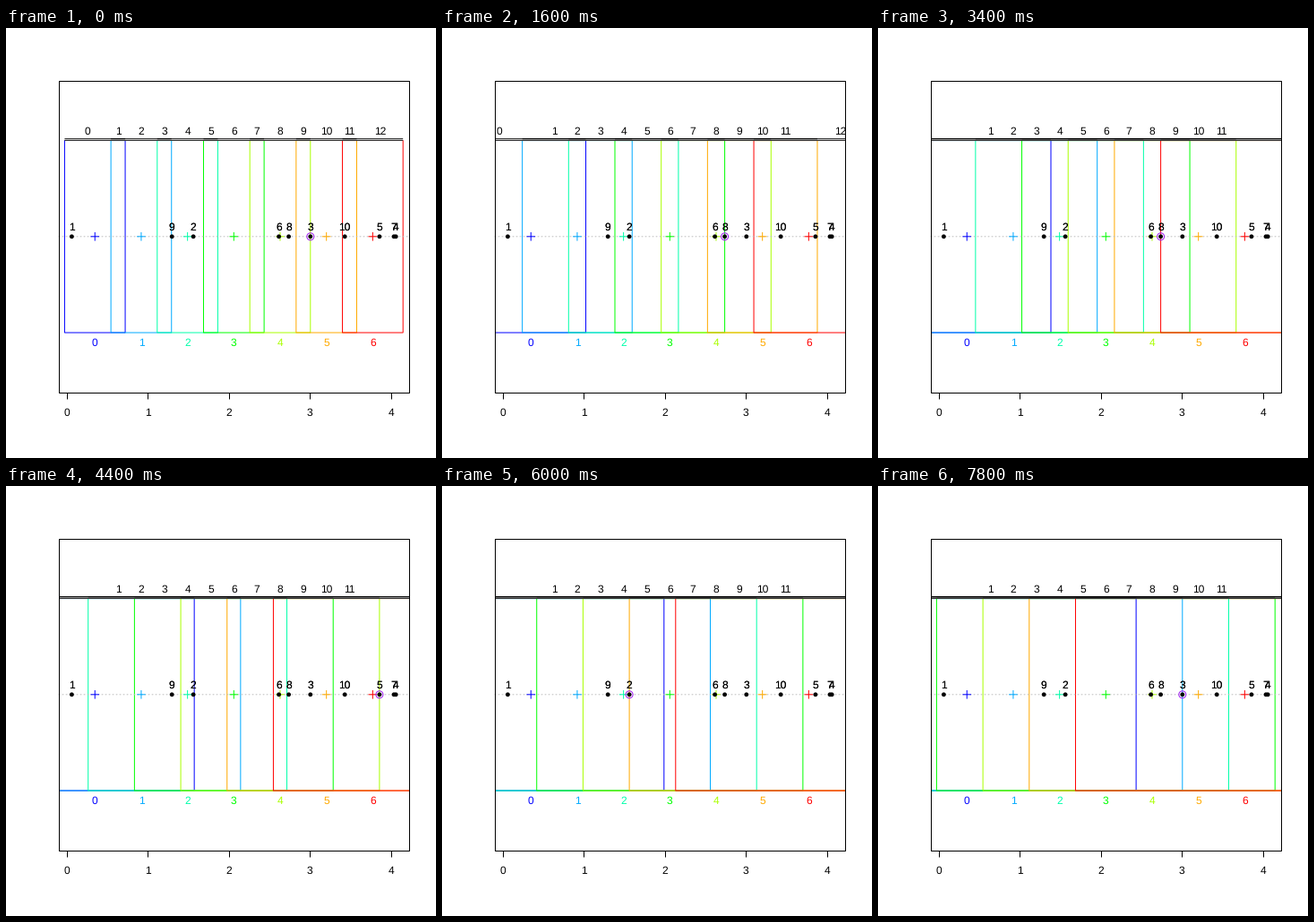
A matplotlib script that plays this animation: 480x480 px, repeating every 8000 ms.

```python
import colorsys

import matplotlib.pyplot as plt
from matplotlib.animation import FuncAnimation
from matplotlib.patches import Circle, Rectangle

plt.rcParams["font.family"] = "Liberation Sans"
plt.rcParams["font.size"] = 12
plt.rcParams["text.hinting"] = "none"

SIZE = 480
LEFT, RIGHT, TOP, BOTTOM = 59.04, 449.76, 59.04, 406.56
MID, UNIT = 232.8, 107.25           # y = 0 and the height of one y unit
X0, X_UNIT = 67.7, 90.5             # x = 0 and the width of one x unit
N = 7
FRAMES = 40

points = [73.4, 209.1, 339.8, 435.2, 416.9, 304.6, 433.0, 315.6, 185.2, 378.2]
step = (max(points) - min(points)) / N
centers = [min(points) + step * (k + 0.5) for k in range(N)]
colors = [colorsys.hsv_to_rgb((1 - k / (N - 1)) * 2 / 3, 1, 1) for k in range(N)]

# The intervals grow until the next point meets an interval edge.
events = sorted((round(abs(p - c), 1), i, abs(p - c))
                for i, p in enumerate(points) for c in centers)
events = [(half, i) for key, i, half in events if key > 33.5][:FRAMES]

fig = plt.figure(figsize=(SIZE / 72, SIZE / 72), dpi=72, facecolor="white")
ax = fig.add_axes([0, 0, 1, 1])
ax.set_xlim(0, SIZE)
ax.set_ylim(SIZE, 0)
ax.axis("off")

frame = Rectangle((LEFT, TOP), RIGHT - LEFT, BOTTOM - TOP, fill=False,
                  ec="black", lw=1, snap=True, zorder=9)
ax.add_patch(frame)
clip = Rectangle((59, 59), 391, 348, transform=ax.transData)


def y_at(v):
    return MID - v * UNIT


def line(xs, ys, color, z, snap=False, **kw):
    return ax.plot(xs, ys, color=color, lw=1, snap=snap, zorder=z, **kw)[0]


def label(x, y, text, color="black"):
    t = ax.text(x, y + 4.2, text, color=color, ha="center", va="baseline",
                zorder=8)
    return t


# axis
for v in range(5):
    x = X0 + v * X_UNIT
    line([x, x], [BOTTOM, BOTTOM + 7.2], "black", 9, snap=True,
         solid_capstyle="butt")
    label(x, 428.8, str(v))

# intervals with the black bars above them
boxes, bars = [], []
for k, color in enumerate(colors):
    box = Rectangle((0, y_at(1)), 1, 2 * UNIT, fill=False, ec=color, lw=1,
                    snap=False, zorder=2 + k / 10)
    ax.add_patch(box)
    box.set_clip_path(clip)
    boxes.append(box)
    for y, shade in ((123.75, "black"), (125.5, "#333333")):
        bar = line([0, 1], [y, y], shade, 3, solid_capstyle="butt")
        bar.set_clip_path(clip)
        bars.append((bar, k))

# center line, centers and their names
line([LEFT, RIGHT], [MID, MID], "#bebebe", 4, linestyle=(0, (1, 3)),
     dash_capstyle="round")
for k, (c, color) in enumerate(zip(centers, colors)):
    line([c - 4.3, c + 4.3], [MID, MID], color, 5)
    line([c, c], [MID - 4.3, MID + 4.3], color, 5)
    label(c, y_at(-1.1), str(k), color)

# names of the pieces; only the first and the last one move
pieces = [label(centers[0] + step * j / 2, y_at(1.1), str(j))
          for j in range(2 * N - 1)]
for t in (pieces[0], pieces[-1]):
    t.set_clip_on(True)
    t.set_clip_path(clip)

for i, p in enumerate(points):
    ax.add_patch(Circle((p, MID), 2.4, fc="black", ec="none", zorder=6))
    for _ in range(2):              # drawn twice for a heavier look
        label(p, y_at(0.1), str(i + 1))

ring = Circle((0, MID), 4, fill=False, ec="#a020f0", lw=1, zorder=7)
ax.add_patch(ring)


def update(n):
    half, i = events[n]
    for box, c in zip(boxes, centers):
        box.set_x(c - half)
        box.set_width(2 * half)
    for bar, k in bars:
        bar.set_xdata([centers[k] - half, centers[k] + half])
    pieces[0].set_x(centers[0] - half + step / 2)
    pieces[-1].set_x(centers[-1] + half - step / 2)
    ring.center = (points[i], MID)
    return []


anim = FuncAnimation(fig, update, frames=FRAMES, interval=200, repeat=True,
                     repeat_delay=0, init_func=lambda: update(0), blit=False)
plt.show()
```
